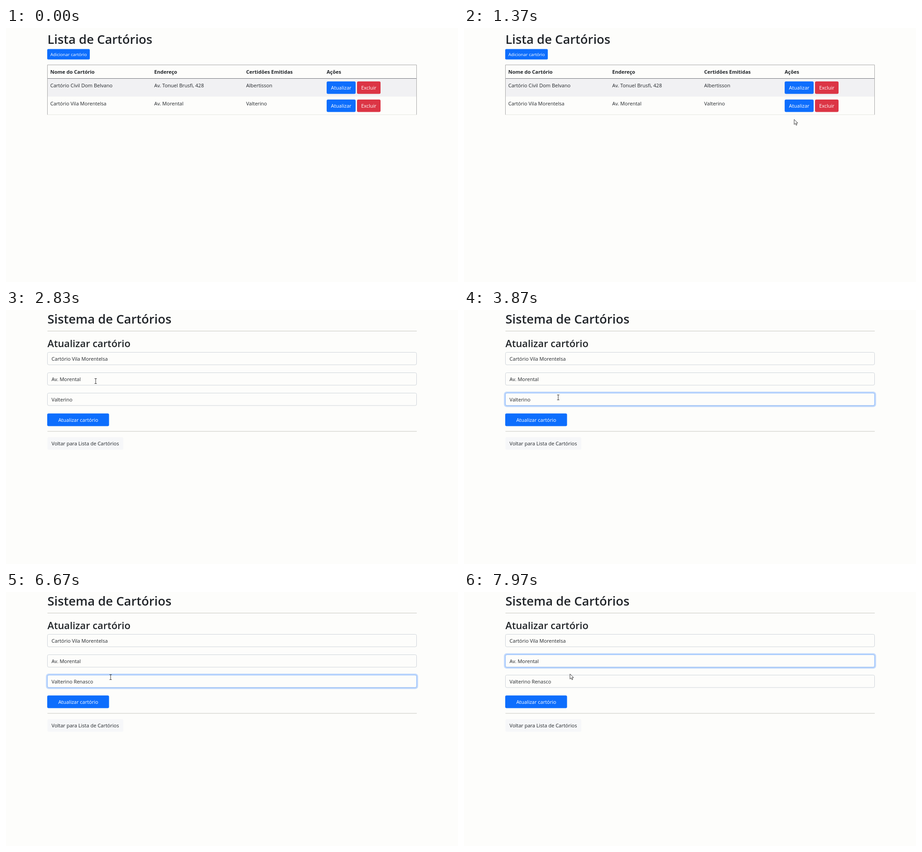
An HTML page that plays this animation: 998x561 px, repeating every 8 s.

```html
<!DOCTYPE html>
<html lang="pt-BR">
<head>
<meta charset="utf-8">
<title>Lista de Cartórios</title>
<style>
  html, body { margin: 0; width: 100%; height: 100%; overflow: hidden; background: #fdfdfb; }
  svg { display: block; width: 100%; height: 100%; }
  text { font: 11px "Open Sans", "Noto Sans", sans-serif; fill: #212529; white-space: pre; }
  .h1 { font-size: 27.4px; font-weight: 600; }
  .h2 { font-size: 21.8px; font-weight: 600; }
  .th { font-weight: 700; }
  .small { font-size: 9.7px; }
  .label { fill: #fff; text-anchor: middle; }
  .status { font-size: 8.25px; fill: #b4b6b9; }
  .primary { fill: #0d6efd; }
  .danger { fill: #dc3545; }
  .input { fill: #fdfdfb; stroke: #ced4da; }
  .rule { stroke: #c6c6bf; }
  .ring { fill: none; stroke: #0d6efd; stroke-opacity: .25; stroke-width: 3; }
  .focus { fill: none; stroke: #86b7fe; }
  .pointer { fill: #fff; stroke: #222; stroke-width: .9; stroke-linejoin: round; }
</style>
</head>
<body>
<svg viewBox="0 0 998 561" preserveAspectRatio="none">
  <g id="list">
    <text class="h1" x="91.5" y="35">Lista de Cartórios</text>
    <rect class="primary" x="91" y="46.5" width="94" height="23" rx="2.2"/>
    <text class="label small" x="138.3" y="62">Adicionar cartório</text>
    <rect x="92" y="112" width="814" height="39.5" fill="#f1f1f3"/>
    <path d="M91.5 191.5V81.5H906.5V191.5" fill="none" stroke="#a6a6a6"/>
    <path d="M92 111.5H906" stroke="#6f7078"/>
    <path d="M92 191.5H906" stroke="#e6e7e2"/>
    <g id="table"></g>
    <g id="hover">
      <rect x="708" y="158" width="64" height="27.5" rx="3" fill="#0b5ed7"/>
      <rect id="buttonRing" class="ring" x="706.7" y="156.7" width="66.6" height="30.1" rx="4" style="stroke-opacity:.5"/>
      <text class="label" x="740" y="176">Atualizar</text>
    </g>
    <g id="status">
      <path d="M0 545H154.5a2 2 0 0 1 2 2V561H0Z" fill="#393a3d"/>
      <text class="status" x="4" y="556.3">localhost:8080/showFormForUpdate/6</text>
    </g>
  </g>
  <g id="form">
    <text class="h1" x="91.5" y="29.5">Sistema de Cartórios</text>
    <path class="rule" d="M91.5 46.5H907M91.5 268H907"/>
    <text class="h2" x="91.5" y="82">Atualizar cartório</text>
    <g id="inputs"></g>
    <path id="caret" stroke="#212529" d="M.5-10V3"/>
    <rect class="primary" x="91" y="228.5" width="136.5" height="28" rx="3"/>
    <text class="label" x="159.5" y="247">Atualizar cartório</text>
    <rect x="91.5" y="281" width="167.5" height="27.5" rx="3" fill="#f6f7f9"/>
    <text x="100.6" y="299">Voltar para Lista de Cartórios</text>
  </g>
  <g id="cursor">
    <path id="arrow" class="pointer" d="M0 0V11.2L2.6 8.8 4.4 12.9 6.2 12.1 4.5 8.1H8Z"/>
    <path id="hand" class="pointer" d="M-1.2 9V1.2C-1.2-.3 1.2-.3 1.2 1.2V5.8C1.5 4.8 3.3 5 3.4 6.2 3.9 5.4 5.3 5.8 5.4 6.8 6 6.3 7.2 6.7 7.2 7.8V11.2L5.8 15.8H-.8L-4.6 10.4C-5.3 9-3.5 8-2.5 9.1L-1.2 10.5Z"/>
    <path id="beam" d="M-2.5-5.5H2.5M0-5.5V5.5M-2.5 5.5H2.5" fill="none" stroke="#333"/>
  </g>
</svg>
<script>
const LOOP = 8000, CURSOR_IN = 30, STATUS_IN = 1700, PRESS = 1980, OPEN_FORM = 2150;
const FOCUS_NAME = 3270, FOCUS_STREET = 7200, BLINK = 500;
const OWNER = 'Valterino', SURNAME = ' Renasco';
const PLACE = 'Cartório Vila Morentelsa', STREET = 'Av. Morental';

// Time at which each further character of the surname appears
const KEYS = [4080, 4100, 4700, 5200, 5600, 5950, 6040, 6130];

// Pointer path: time, x, y
const PATH = [
  [30, 400, 10], [230, 92, 260], [430, 480, 470], [630, 965, 240], [760, 880, 62],
  [880, 500, 62], [1000, 115, 230], [1150, 460, 415], [1270, 795, 290],
  [1370, 729, 202], [1560, 732, 185], [1700, 733, 183], [2200, 733, 183],
  [2480, 420, 170], [2720, 203, 158], [2830, 198, 157], [3000, 198, 157],
  [3200, 208, 193], [5950, 208, 193], [6500, 231, 188], [6750, 231, 188],
  [7150, 236, 155], [7280, 236, 155], [7540, 234, 181], [8000, 234, 181]
];

const $ = id => document.getElementById(id);
const show = (id, on) => { $(id).style.display = on ? '' : 'none'; };
const clamp = v => Math.max(0, Math.min(1, v));
const text = (x, y, s, cls = '') => `<text class="${cls}" x="${x}" y="${y}">${s}</text>`;
const button = (x, y, w, label, cls) =>
  `<rect class="${cls}" x="${x}" y="${y}" width="${w}" height="27.5" rx="3"/>` +
  text(x + w / 2, y + 18, label, 'label');

const COLUMNS = [97.7, 327.3, 530.3, 708];
const cells = (values, y, cls) => values.map((s, i) => text(COLUMNS[i], y, s, cls)).join('');
const row = (values, y) => cells(values, y) +
  button(708, y - 13, 64, 'Atualizar', 'primary') + button(775, y - 13, 52, 'Excluir', 'danger');

$('table').innerHTML =
  cells(['Nome do Cartório', 'Endereço', 'Certidões Emitidas', 'Ações'], 101, 'th') +
  row(['Cartório Cívil Dom Belvano', 'Av. Tonuel Brusfi, 428', 'Albertisson'], 131) +
  row([PLACE, STREET, OWNER], 171);

const INPUT_Y = [93.5, 138.5, 183.5];
$('inputs').innerHTML = [PLACE, STREET, OWNER].map((value, i) => {
  const y = INPUT_Y[i];
  return `<rect class="input" x="91.5" y="${y}" width="815" height="27.5" rx="3"/>
    <g id="focus${i}">
      <rect class="ring" x="89.7" y="${y - 1.8}" width="818.6" height="31.1" rx="4.5"/>
      <rect class="focus" x="91.5" y="${y}" width="815" height="27.5" rx="3"/>
    </g>
    <text id="value${i}" x="100.6" y="${y + 18}">${value}</text>`;
}).join('');

function pointerAt(t) {
  const i = Math.max(1, PATH.findIndex(p => p[0] >= t));
  const [t0, x0, y0] = PATH[i - 1], [t1, x1, y1] = PATH[i];
  const k = clamp((t - t0) / (t1 - t0));
  return [x0 + (x1 - x0) * k, y0 + (y1 - y0) * k];
}

function drawCaret(t) {
  const field = t < FOCUS_STREET ? 2 : 1;
  const lastEvent = Math.max(...[FOCUS_NAME, ...KEYS, FOCUS_STREET].filter(e => e <= t));
  const on = t >= FOCUS_NAME && Math.floor((t - lastEvent) / BLINK) % 2 === 0;
  show('caret', on);
  if (!on) return;
  const x = Math.round(100.6 + $('value' + field).getComputedTextLength());
  $('caret').setAttribute('transform', `translate(${x} ${INPUT_Y[field] + 17.5})`);
}

function draw(t) {
  const onForm = t >= OPEN_FORM;
  const [x, y] = pointerAt(t);
  const overButton = !onForm && x > 708 && x < 772 && y > 158 && y < 185.5;
  const overInput = onForm && INPUT_Y.some(top => y >= top - .5 && y <= top + 27.5);

  show('list', !onForm);
  show('form', onForm);
  show('hover', overButton);
  show('buttonRing', t >= PRESS);
  show('status', t >= STATUS_IN);

  const left = clamp((t - FOCUS_STREET) / 150);
  $('focus0').style.opacity = 0;
  $('focus1').style.opacity = left;
  $('focus2').style.opacity = clamp((t - FOCUS_NAME) / 150) - left;
  $('value2').textContent = OWNER + SURNAME.slice(0, KEYS.filter(k => k <= t).length);
  if (onForm) drawCaret(t);

  show('cursor', t >= CURSOR_IN);
  show('hand', overButton);
  show('beam', overInput);
  show('arrow', !overButton && !overInput);
  $('cursor').setAttribute('transform', `translate(${x} ${y})`);
}

const start = performance.now();
function tick() {
  draw((performance.now() - start) % LOOP);
  requestAnimationFrame(tick);
}
tick();
</script>
</body>
</html>
```
